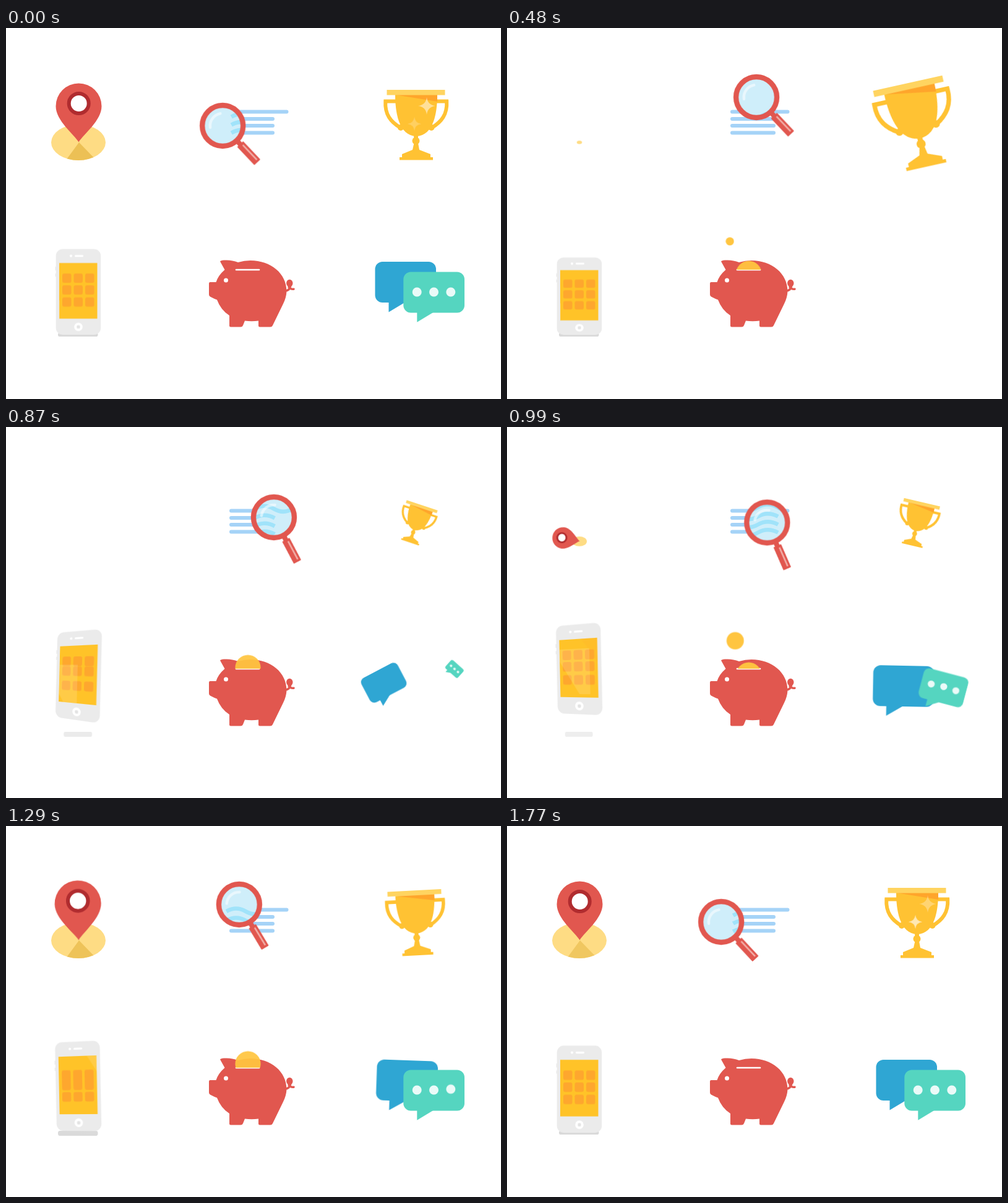
These frames come from a looping animation (800x600 px, 1800 ms). An HTML page without scripts:

```html
<!DOCTYPE html>
<html lang="en">
<head>
<meta charset="utf-8">
<title>Six icons</title>
<style>
@property --x { syntax: '<length>'; inherits: true; initial-value: 350px }
@property --y { syntax: '<length>'; inherits: true; initial-value: 158px }

html, body { margin: 0; width: 100%; height: 100%; overflow: hidden; background: #fff }
svg { position: absolute; left: 0; top: 0; width: 800px; height: 600px }
[class] { animation: 1.8s linear infinite }

/* map pin */
.disc { transform-origin: 117px 185px; animation-name: disc }
.wedge { animation-name: wedge }
.pin { transform-origin: 117.5px 184.5px; animation-name: pin }
@keyframes disc {
  0%, 16.67% { transform: scale(1) }
  21.67% { transform: scale(.7) }
  26.67% { transform: scale(.1) }
  28%, 50% { transform: scale(0) }
  61.67% { transform: scale(.63) }
  69%, 100% { transform: scale(1) }
}
@keyframes wedge {
  0%, 100% { opacity: 1 }
  8%, 66.67% { opacity: 0 }
  71.67% { opacity: .9 }
  98.33% { opacity: .75 }
}
@keyframes pin {
  0%, 3.33% { transform: translateY(0) rotate(0deg) scale(1) }
  6.67% { transform: translateY(15px) rotate(0deg) scale(1) }
  10% { transform: translateY(52px) rotate(0deg) scale(1) }
  13.33% { transform: translateY(107px) rotate(0deg) scale(1) }
  16% { transform: translateY(150px) rotate(0deg) scale(1) }
  16.01%, 50% { transform: translateY(0) rotate(-90deg) scale(0) }
  56.67% { transform: translateY(0) rotate(-76deg) scale(.62) }
  60% { transform: translateY(0) rotate(-68deg) scale(.88) }
  61.67% { transform: translateY(0) rotate(-64deg) scale(.925) }
  66.67% { transform: translateY(0) rotate(-15deg) scale(1.1) }
  71.67% { transform: translateY(0) rotate(-1.3deg) scale(1.015) }
  77% { transform: translateY(0) rotate(1deg) scale(1) }
  83%, 100% { transform: translateY(0) rotate(0deg) scale(1) }
}

/* magnifier */
.lens { transform: translate(var(--x), var(--y)); animation-name: lens }
#waves { transform: translate(calc(var(--x) * -1), calc(var(--y) * -1)) }
.turn { animation-name: turn }
@keyframes lens {
  0%, 100% { --x: 350px; --y: 158px }
  3.33% { --x: 358px; --y: 161px }
  6.67% { --x: 366px; --y: 160px }
  10% { --x: 374px; --y: 153px }
  13.33% { --x: 382px; --y: 143px }
  20% { --x: 394px; --y: 121px }
  26.67% { --x: 403px; --y: 112px }
  30% { --x: 407px; --y: 110px }
  33.33% { --x: 414px; --y: 112px }
  40% { --x: 427px; --y: 125px }
  48.33% { --x: 433px; --y: 146px }
  53.33% { --x: 426px; --y: 155px }
  56.67% { --x: 415px; --y: 154px }
  61.67% { --x: 400px; --y: 145px }
  66.67% { --x: 388px; --y: 136px }
  71.67% { --x: 377px; --y: 127px }
  78.33% { --x: 361px; --y: 119px }
  85% { --x: 346px; --y: 120px }
  90% { --x: 338px; --y: 129px }
  94.5% { --x: 338px; --y: 143px }
  98.33% { --x: 346px; --y: 155px }
}
@keyframes turn {
  0%, 30%, 100% { transform: rotate(.5deg) }
  48.33% { transform: rotate(16deg) }
  56% { transform: rotate(21deg) }
  61.67% { transform: rotate(20deg) }
  71.67% { transform: rotate(13deg) }
  90% { transform: rotate(3deg) }
  98.33% { transform: rotate(1deg) }
}

/* trophy */
.cup { transform-origin: 662.7px 156.7px; animation-name: cup }
.s1 { animation-name: s1 }
.s2 { animation-name: s2 }
.s3 { animation-name: s3 }
.s4 { animation-name: s4 }
@keyframes cup {
  0%, 16.67% { transform: rotate(0deg) scale(1) }
  21.67% { transform: rotate(-6deg) scale(1.12) }
  26.67% { transform: rotate(-12.5deg) scale(1.22) }
  30% { transform: rotate(-14deg) scale(1.24) }
  35% { transform: rotate(-5deg) scale(1.1) }
  40% { transform: rotate(8deg) scale(.84) }
  48.33% { transform: rotate(18.5deg) scale(.56) }
  51.67% { transform: rotate(18deg) scale(.54) }
  56.67% { transform: rotate(11deg) scale(.68) }
  61.67% { transform: rotate(2.5deg) scale(.83) }
  66.67% { transform: rotate(-2deg) scale(.89) }
  71.67% { transform: rotate(-3deg) scale(.925) }
  80% { transform: rotate(-1deg) scale(.98) }
  87%, 100% { transform: rotate(0deg) scale(1) }
}
@keyframes s1 {
  0%, 100% { opacity: .65 }
  4% { opacity: .8 }
  10%, 94% { opacity: 0 }
  98.33% { opacity: .4 }
}
@keyframes s2 {
  0%, 100% { opacity: .3 }
  3%, 88% { opacity: 0 }
  95%, 98.33% { opacity: .85 }
}
@keyframes s3 {
  0%, 8%, 17%, 100% { opacity: 0 }
  11%, 13.33% { opacity: .35 }
}
@keyframes s4 {
  0%, 56%, 67%, 100% { opacity: 0 }
  61.67% { opacity: .8 }
}

/* phone */
.phone { transform-origin: 117px 425px; animation-name: phone }
.shade { transform-origin: 116px 493px; animation-name: shade }
.top { animation-name: top }
.mid { transform-origin: 0 430.5px; animation-name: mid }
.shine { animation-name: shine }
.glow { animation-name: glow }
@keyframes phone {
  0%, 100% { transform: translate(0, 0) perspective(100px) rotate(0deg) rotateY(0deg) scaleY(1) }
  6.67% { transform: translate(0, 4.5px) perspective(100px) rotate(0deg) rotateY(0deg) scaleY(.938) }
  12.5%, 32% { transform: translate(0, 7.1px) perspective(100px) rotate(0deg) rotateY(0deg) scaleY(.903) }
  39% { transform: translate(-.5px, -3px) perspective(100px) rotate(.5deg) rotateY(-3deg) scaleY(1.03) }
  48.33% { transform: translate(-1.5px, -24.8px) perspective(100px) rotate(1.5deg) rotateY(-9deg) scaleY(1.04) }
  55% { transform: translate(-1.5px, -35px) perspective(100px) rotate(-1.3deg) rotateY(-5deg) scaleY(1.05) }
  61.67% { transform: translate(-1.2px, -32px) perspective(100px) rotate(-2.8deg) rotateY(-2.5deg) scaleY(1.065) }
  71.67% { transform: translate(-.7px, -6px) perspective(100px) rotate(-1.2deg) rotateY(-2deg) scaleY(1.045) }
  76.67% { transform: translate(0, 2px) perspective(100px) rotate(0deg) rotateY(0deg) scaleY(.975) }
  85% { transform: translate(0, -.7px) perspective(100px) rotate(0deg) rotateY(0deg) scaleY(1.01) }
  93.33% { transform: translate(0, -2.5px) perspective(100px) rotate(0deg) rotateY(0deg) scaleY(1.034) }
  98.33% { transform: translate(0, -1.2px) perspective(100px) rotate(0deg) rotateY(0deg) scaleY(1.017) }
}
@keyframes shade {
  0%, 36%, 78%, 100% { transform: scale(1); opacity: 1 }
  48.33% { transform: scale(.71, 1.33); opacity: .52 }
  61.67% { transform: scale(.68, 1.33); opacity: .4 }
  71.67% { transform: scale(1, 1.33); opacity: .95 }
}
@keyframes top {
  0%, 64%, 79%, 100% { transform: translateY(0) }
  71.67% { transform: translateY(4.5px) }
}
@keyframes mid {
  0%, 40%, 64%, 79%, 100% { transform: translateY(0) scaleY(1) }
  48.33% { transform: translateY(-3.5px) scaleY(1) }
  58% { transform: translateY(0) scaleY(1) }
  71.67% { transform: translateY(1.5px) scaleY(1.35) }
}
@keyframes shine {
  0%, 40% { transform: translate(-60px, 60px); opacity: 1 }
  48.33% { transform: translate(-30px, 30px) }
  71.67% { transform: translate(32px, -22px); opacity: 1 }
  80%, 100% { transform: translate(60px, -60px); opacity: 0 }
}
@keyframes glow {
  0%, 52%, 70%, 100% { opacity: 0 }
  61.67% { opacity: .55 }
}

/* coins */
.coin { animation-name: coin }
.glint { animation-name: glint }
.arc { animation-name: arc }
.c2, .c2 [class] { animation-delay: -1.35s }
.c3, .c3 [class] { animation-delay: -.9s }
@keyframes coin {
  0% { transform: translate(356px, 346px) scale(0); opacity: 1 }
  1.67% { transform: translate(360px, 345px) scale(.32); opacity: 1 }
  6.67% { transform: translate(373px, 346px) scale(.85); opacity: 1 }
  11.67% { transform: translate(383px, 359px) scale(1); opacity: 1 }
  13.33% { transform: translate(385.5px, 363px) scale(1); opacity: 1 }
  21.67% { transform: translate(391px, 384.5px) scale(1); opacity: .93 }
  23.33% { transform: translate(391px, 389px) scale(1); opacity: .93 }
  26.67% { transform: translate(390.7px, 397px) scale(1); opacity: .95 }
  36.67% { transform: translate(390.7px, 409px) scale(1); opacity: 1 }
  40% { transform: translate(390.7px, 414px) scale(1); opacity: 1 }
  40.01%, 100% { transform: translate(356px, 346px) scale(0); opacity: 1 }
}
@keyframes glint {
  0%, 11.67%, 19%, 100% { opacity: 0 }
  13.33%, 15% { opacity: .5 }
}
@keyframes arc {
  0%, 5%, 20%, 100% { opacity: 0 }
  10%, 14% { opacity: .6 }
}

/* chat */
.blue { transform-origin: 646px 411px; animation-name: blue }
.teal { transform-origin: 691.5px 427.5px; animation-name: teal }
.dots { animation-name: dots }
.d1 { animation-name: d1 }
.d2 { animation-name: d2 }
.d3 { animation-name: d3 }
@keyframes blue {
  0%, 3.33% { transform: translate(0, 0) rotate(0deg) scale(1); opacity: 1 }
  13.33% { transform: translate(0, 0) rotate(0deg) scale(1); opacity: .27 }
  17% { transform: translate(0, 0) rotate(0deg) scale(1); opacity: 0 }
  17.01%, 40% { transform: translate(-60px, 0) rotate(-60deg) scale(0); opacity: 1 }
  48.33% { transform: translate(-35.5px, 2.5px) rotate(-28deg) scale(.67) }
  55% { transform: translate(-5px, 8px) rotate(1deg) scale(1) }
  61.67% { transform: translate(5.6px, 8px) rotate(7deg) scale(1) }
  71.67% { transform: translate(2.3px, 1px) rotate(2deg) scale(1) }
  80%, 100% { transform: translate(0, 0) rotate(0deg) scale(1); opacity: 1 }
}
@keyframes teal {
  0%, 12% { transform: translate(0, 0) rotate(0deg) scale(1); opacity: 1 }
  13.33% { opacity: .97 }
  22% { transform: translate(0, 0) rotate(0deg) scale(1); opacity: 0 }
  22.01%, 45% { transform: translate(37px, -44px) rotate(55deg) scale(0); opacity: 1 }
  48.33% { transform: translate(33.5px, -36.5px) rotate(42deg) scale(.27) }
  55% { transform: translate(14px, -6px) rotate(15deg) scale(.75) }
  61.67% { transform: translate(-.8px, 11px) rotate(-7.5deg) scale(1.1) }
  66.67% { transform: translate(-.3px, 4px) rotate(-3deg) scale(1.04) }
  71.67%, 100% { transform: translate(0, 0) rotate(0deg) scale(1); opacity: 1 }
}
@keyframes dots {
  0%, 6% { opacity: .88 }
  13.33% { opacity: .56 }
  20% { opacity: 0 }
  22.01%, 100% { opacity: .88 }
}
@keyframes d1 {
  0%, 54%, 69%, 100% { transform: translateY(0) }
  61.67% { transform: translate(-1px, -4.5px) }
}
@keyframes d2 {
  0%, 54%, 71%, 100% { transform: translateY(0) }
  61.67% { transform: translateY(-14.5px) }
}
@keyframes d3 {
  0%, 55%, 74%, 100% { transform: translateY(0) }
  61.67% { transform: translateY(-13.5px) }
  71.67% { transform: translateY(-1.5px) }
}
</style>
</head>
<body>
<svg viewBox="0 0 800 600">
  <defs>
    <clipPath id="hole">
      <path d="M0 0H200V185H80V230H0Z"/>
      <ellipse cx="117" cy="185" rx="44" ry="29.5"/>
    </clipPath>
    <clipPath id="disc"><ellipse cx="117" cy="185" rx="44" ry="29"/></clipPath>
    <clipPath id="glass"><circle r="29.5"/></clipPath>
    <clipPath id="slot"><path d="M300 300H480V391H300Z"/></clipPath>
    <path id="star" d="M0-14Q1.5-1.5 14 0Q1.5 1.5 0 14Q-1.5 1.5-14 0Q-1.5-1.5 0-14Z"/>
    <g id="half">
      <path d="M632 118.5H613.3C612 140 622 152 637 161" fill="none" stroke="#ffc233" stroke-width="6"/>
      <circle cx="638" cy="161" r="5"/>
    </g>
  </defs>

  <g class="disc">
    <ellipse cx="117" cy="185" rx="44" ry="29" fill="#fedc84"/>
    <path class="wedge" clip-path="url(#disc)" d="M118 185L96 215H147Z" fill="#ecc055"/>
  </g>
  <g clip-path="url(#hole)">
    <g class="pin">
      <path d="M117.5 184.5C110 172 80.5 150 80.5 126.5A37 37 0 0 1 154.5 126.5C154.5 150 125 172 117.5 184.5Z" fill="#e1574f"/>
      <circle cx="117.7" cy="122" r="16" fill="#fff" stroke="#b02c2f" stroke-width="6"/>
    </g>
  </g>

  <path d="M364 135.5H453.5M364 147H431M364 158H431M364 169.5H431" stroke="#a5d3f7" stroke-width="6" stroke-linecap="round"/>
  <g class="lens">
    <circle r="33" fill="#cfeefa"/>
    <g clip-path="url(#glass)">
      <g transform="scale(1.3)">
        <path id="waves" fill="none" stroke="#a0e3fa" stroke-width="5" d="M361 135.5q12-7 24 0t24 0t24 0t23 0M361 147q12-7 24 0t24 0t25 0M361 157q12-7 24 0t24 0t25 0M361 167q12-7 24 0t24 0t25 0"/>
      </g>
    </g>
    <g class="turn">
      <path d="M-20 3A20 20 0 0 1-4-19.6" fill="none" stroke="#fff" stroke-opacity=".55" stroke-width="4.5" stroke-linecap="round"/>
      <g transform="rotate(46)">
        <path d="M34-4H44V4H34Z" fill="#e1574f"/>
        <rect x="41" y="-6.7" width="40.5" height="13.4" rx="1" fill="#e1574f"/>
        <path d="M45-2.2H78" stroke="#f2b0a9" stroke-width="2.6"/>
      </g>
    </g>
    <circle r="33" fill="none" stroke="#e1574f" stroke-width="8.4"/>
  </g>

  <g class="cup" fill="#ffc233">
    <use href="#half"/>
    <use href="#half" transform="matrix(-1 0 0 1 1325.5 0)"/>
    <path d="M629 108C629 135 634 174 663 175C692 174 697 135 697 108Z"/>
    <path d="M629 108H697V119Z" fill="#ffa52b"/>
    <path d="M615.5 100H709.5V108.5H615.5Z" fill="#ffd460"/>
    <path d="M659 172H666V186L668 197L686 204V209H690V213.5H636V209H640V204L657 197L659.5 186Z"/>
    <circle cx="662.5" cy="182.5" r="6"/>
    <g fill="#fff0cf">
      <g transform="translate(680 126)"><use class="s1" href="#star"/></g>
      <g transform="translate(660 155) scale(.8)"><use class="s2" href="#star"/></g>
      <g transform="translate(657 205) scale(.65)"><use class="s3" href="#star"/></g>
      <g transform="translate(664 146) scale(.75)"><use class="s4" href="#star"/></g>
    </g>
  </g>

  <rect class="shade" x="84" y="493" width="64.5" height="6" rx="2.8" fill="#d9d9d9"/>

  <g fill="#e1574f">
    <path d="M346 377.5Q347 376 352 375.6Q364 374.5 375 379Q385 376 395 376C428 376 453.5 397 453.5 426Q453 436 448 446L431 481Q430 483.5 427 483.5H410Q408 483.5 408 481.5V473.5Q397 475 386 473.5L383 481Q382 483.5 379 483.5H363Q361 483.5 361 481.5V465Q347 456 341 439.5L337 438L330 434.5Q328 433.5 328 431V413Q328 411 330 411H339.5Q343 400 353.5 391Z"/>
    <ellipse cx="458.3" cy="412.8" rx="5.2" ry="6"/>
    <path d="M452 425Q459 424 460 416M457 419Q460 423 465 422.3" fill="none" stroke="#e1574f" stroke-width="3.4" stroke-linecap="round"/>
  </g>
  <circle cx="355.5" cy="408" r="3.5" fill="#fff"/>
  <path d="M372 391H409" stroke="#fff" stroke-width="2.6" stroke-linecap="round"/>
  <g clip-path="url(#slot)">
    <g class="coin">
      <circle r="20.6" fill="#ffc540"/>
      <path class="arc" d="M8-12Q17 2 5 15" fill="none" stroke="#fff" stroke-width="4" stroke-linecap="round"/>
      <g transform="translate(-14 -7) scale(.65)"><use class="glint" href="#star" fill="#fff"/></g>
    </g>
    <g class="coin c2">
      <circle r="20.6" fill="#ffc540"/>
      <path class="arc" d="M8-12Q17 2 5 15" fill="none" stroke="#fff" stroke-width="4" stroke-linecap="round"/>
      <g transform="translate(-14 -7) scale(.65)"><use class="glint" href="#star" fill="#fff"/></g>
    </g>
    <g class="coin c3">
      <circle r="20.6" fill="#ffc540"/>
      <path class="arc" d="M8-12Q17 2 5 15" fill="none" stroke="#fff" stroke-width="4" stroke-linecap="round"/>
      <g transform="translate(-14 -7) scale(.65)"><use class="glint" href="#star" fill="#fff"/></g>
    </g>
  </g>

  <g class="blue" fill="#2fa6d3">
    <rect x="596.5" y="378" width="98.5" height="66" rx="12"/>
    <path d="M618.5 443V459.5L646 443Z"/>
  </g>
  <g class="teal" fill="#55d5c0">
    <rect x="642.3" y="394.5" width="98.7" height="66" rx="12"/>
    <path d="M664.3 459V475.8L692 459Z"/>
    <g class="dots" fill="#fff">
      <circle class="d1" cx="664.2" cy="427" r="7.5"/>
      <circle class="d2" cx="691.5" cy="427" r="7.5"/>
      <circle class="d3" cx="718.8" cy="427" r="7.5"/>
    </g>
  </g>
</svg>

<svg class="phone" viewBox="0 0 800 600">
  <defs>
    <clipPath id="screen"><path d="M86 380H147.5V470H86Z"/></clipPath>
    <g id="row">
      <rect x="91" width="14.5" height="15" rx="3"/>
      <rect x="109.5" width="14.5" height="15" rx="3"/>
      <rect x="128" width="14.5" height="15" rx="3"/>
    </g>
  </defs>
  <rect x="80.7" y="357.5" width="72.5" height="138.5" rx="11" fill="#ebebeb"/>
  <path d="M80.5 386V392M80.5 397V402" stroke="#ebebeb" stroke-width="2"/>
  <circle cx="105" cy="368.5" r="2.1" fill="#fff"/>
  <path d="M112.5 368.5H123.5" stroke="#fff" stroke-width="3.2" stroke-linecap="round"/>
  <path d="M86 380H147.5V470H86Z" fill="#ffc328"/>
  <g fill="#fea72e">
    <g class="top"><use href="#row" y="397"/></g>
    <g class="mid"><use href="#row" y="416"/></g>
    <use href="#row" y="435.5"/>
  </g>
  <g clip-path="url(#screen)">
    <path class="shine" d="M86 380L147 380V450L130 450Z" fill="#fff" fill-opacity=".14"/>
    <path class="glow" d="M122 380H147.5V416Z" fill="#fea72e"/>
  </g>
  <circle cx="117" cy="483.3" r="6.8" fill="#fff"/>
  <rect x="114.4" y="480.7" width="5.2" height="5.2" rx="1.6" fill="#e4e4e4"/>
</svg>
</body>
</html>
```
